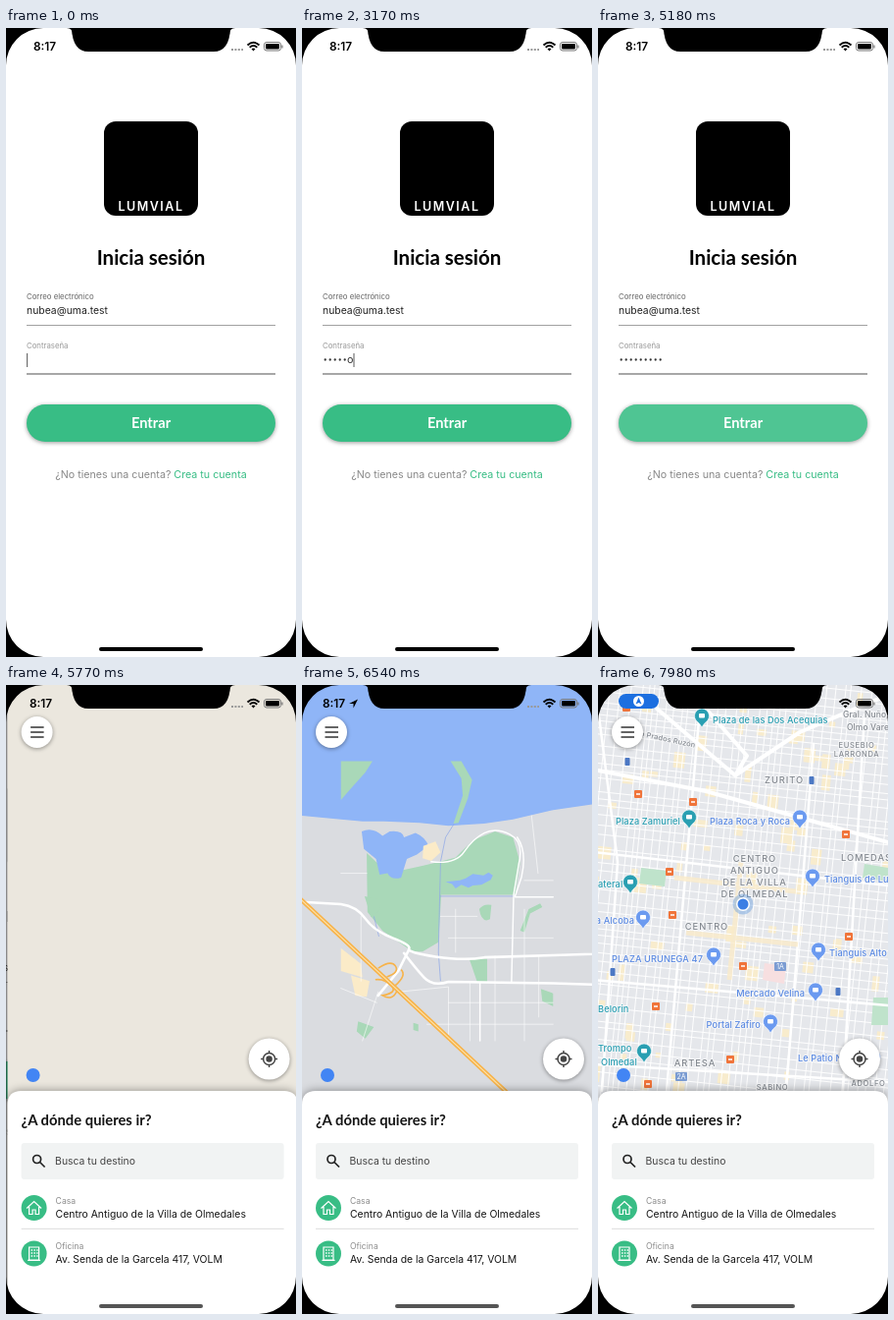
An HTML page for the animation above (8 s loop, 296 by 640 pixels).

```html
<!DOCTYPE html>
<html lang="es">
<head>
<meta charset="utf-8">
<style>
html, body { margin: 0; width: 100%; height: 100%; overflow: hidden; background: #fff }
svg { display: block; width: 100%; height: 100%; font-family: Inter, "Open Sans", sans-serif }
.h { font-family: Lato, "Open Sans", sans-serif; font-weight: 700 }
.mid { text-anchor: middle }
.lift { filter: drop-shadow(0 1px 2px #0006) }
.road { fill: none; stroke: #fff; stroke-linecap: round; stroke-linejoin: round }
.halo text { paint-order: stroke; stroke: #f4f5f7; stroke-width: 2px; stroke-linejoin: round }
</style>
</head>
<body>
<svg viewBox="0 0 296 640">
  <defs>
    <linearGradient id="edge"><stop offset="0" stop-opacity="0"/><stop offset="1" stop-opacity=".5"/></linearGradient>
    <clipPath id="btn"><rect x="21" y="383" width="254" height="38" rx="19"/></clipPath>
  </defs>

  <g id="login">
    <rect width="296" height="640" fill="#fff"/>
    <rect x="100" y="95" width="96" height="96" rx="12"/>
    <text x="148" y="186" class="mid" font-size="12.5" font-weight="600" letter-spacing="1.5" fill="#fff">LUMVIAL</text>
    <text x="148" y="240.500" class="h mid" font-size="20.500">Inicia sesión</text>
    <text x="21" y="276" font-size="7.800" fill="#666">Correo electrónico</text>
    <text x="21" y="291" font-size="10.400" fill="#222">nubea@uma.test</text>
    <path d="M21 302.500H275" stroke="#8a8a8a" stroke-width=".8"/>
    <text x="21" y="326" font-size="7.800" fill="#999">Contraseña</text>
    <g id="dots" fill="#333"></g>
    <text id="last" y="341" font-size="10.800" fill="#333">o</text>
    <path id="cursor" d="M0 331V345" stroke="#666" stroke-width="1.100"/>
    <path d="M21 352H275" stroke="#8a8a8a" stroke-width="1.400"/>
    <rect class="lift" x="21" y="383" width="254" height="38" rx="19" fill="#38bd85"/>
    <circle id="ripple" cx="148" cy="402" fill="#fff" opacity=".22" clip-path="url(#btn)"/>
    <text x="148" y="407" class="h mid" font-size="14.700" fill="#fff">Entrar</text>
    <text x="148" y="457.500" class="mid" font-size="10.700" fill="#888">¿No tienes una cuenta? <tspan fill="#38bd85">Crea tu cuenta</tspan></text>
  </g>

  <g id="page">
    <rect x="-16" width="16" height="640" fill="url(#edge)"/>
    <rect width="296" height="640" fill="#ebe7de"/>

    <g id="bay">
      <rect x="-500" y="-500" width="1300" height="1400" fill="#dadce0"/>
      <path fill="#8fb5f7" d="M-500 -500H800V20L296 92 240 105 200 111 150 114 110 110 60 108 30 108 0 105 -500 60Z"/>
      <g fill="#a9d8b8">
        <path d="M0 24H44L34 40 14 62 0 78ZM153 24H168L183 50 177 76 164 110 157 111 170 72 168 48Z"/>
        <path d="M36 152L66 180 112 170 138 164 160 158 184 134 215 122 240 130 250 165 243 210H140L136 276 114 289 100 289 58 260 37 234Z"/>
        <path d="M33 212L56 216 54 232 42 241ZM193 230Q198 222 210 224L208 244Q196 250 193 230ZM262 230L278 222 281 227 264 236 256 262 250 260ZM179 299H204V331H190ZM101 388L108 390V400L101 398ZM279 341L296 347V365L281 358ZM24 386L46 394 34 410 22 400Z"/>
      </g>
      <path fill="#8fb5f7" d="M29 122Q44 115 58 128L68 122Q86 120 88 130L104 124Q118 130 122 142L106 154 92 160 84 186Q70 190 65 180L54 182 49 160 32 146ZM146 192L166 190 174 187 184 181 199 183 206 179 212 183 209 189 196 196 184 197 178 200 168 196 160 201 155 195Z"/>
      <path fill="#fbebc8" d="M115 142L132 136 139 151 126 163 114 159ZM0 284L28 306 30 325 0 316ZM14 322L40 330 36 352 20 350Z"/>
      <path fill="none" stroke="#8fa8e6" stroke-width="1" d="M158 111L146 130 139 164 136 290 139 330M138 212H243M46 240L53 268"/>
      <g class="road">
        <path stroke-width=".8" d="M0 180H36M0 340L50 360M28 240V330M80 345L150 338V413M180 332V413M215 295V413M256 230V413M238 270H296M150 270H238M139 240H190M276 295V380M150 360H296M120 390H296M160 230V290M256 190H296M30 413L52 345M266 100L275 180"/>
        <path stroke-width="2" d="M126 164Q160 168 172 150T200 124 236 126 248 168L241 210 238 332M246 130Q260 150 252 185L243 212M243 213H296M194 332V413"/>
        <path stroke-width="3.500" d="M-400 200L0 223Q22 226 34 243T72 270 95 285 132 296 200 297L296 294 800 280M95 286L80 316 52 350M88 291Q104 312 116 325T150 331L296 333 800 350"/>
      </g>
      <g fill="none" stroke="#f7b34a">
        <path stroke-width="2.200" d="M52 312Q70 300 76 309T64 324M48 328Q60 326 70 336T58 350Q72 358 78 344M76 336Q92 322 84 314"/>
        <path stroke-width="6" d="M-403 -108L558 790"/>
        <path stroke="#fde3ac" stroke-width="1.500" d="M-403 -108L558 790"/>
      </g>
    </g>

    <g id="far">
      <rect x="-400" y="-600" width="1100" height="1600" fill="#e3e5ea"/>
      <g id="farGrid"></g>
      <path fill="#a5d6b6" d="M35 184L73 188 70 206 33 202ZM0 244L10 247 8 254 0 252ZM62 393L78 396 75 404 60 401Z"/>
      <path class="road" stroke-width="5" d="M-10 203Q42 176 60 150L92 122"/>
      <path class="road" stroke-width="3" d="M-10 103L90 116M20 210L4 420M46 24L34 184M0 330L90 342"/>
      <rect x="82" y="-600" width="800" height="1600" fill="#b7e0c6"/>
    </g>

    <g id="city">
      <rect width="296" height="420" fill="#e5e7eb"/>
      <g id="cityGrid"></g>
      <path fill="#bfe3cb" d="M44 186L70 189 68 205 42 202ZM281 318H296V346H279ZM272 182L296 186V200L270 196Z"/>
      <g class="road">
        <path stroke-width="4" d="M60 24L140 92 206 48 296 10M140 92L152 72 110 24M-5 86L110 108 296 160"/>
        <path stroke-width="2.500" d="M104 24L70 413M220 60L192 413M-5 300L296 326M-5 170L296 204M0 24L20 180 4 413M272 30L250 413M-5 386L296 404"/>
      </g>
      <path fill="none" stroke="#faecca" stroke-width="5" d="M78 196L202 210M146 180L134 300M90 252L204 264" opacity=".8"/>
      <path fill="#f7dfe0" d="M170 283L192 286 190 304 168 300Z"/>
    </g>
    <g id="labels" class="halo"></g>

    <g id="dot">
      <circle cx="148" cy="223" r="10.500" fill="#5b95dd" opacity=".4"/>
      <circle cx="148" cy="223" r="7" fill="#fff"/>
      <circle cx="148" cy="223" r="5.500" fill="#3d7fe4"/>
    </g>

    <circle cx="26" cy="397" r="7" fill="#4285f4"/>
    <g class="lift"><circle cx="30" cy="48" r="16" fill="#fff"/><circle cx="267" cy="380.500" r="21" fill="#fff"/></g>
    <path d="M23.500 43H37M23.500 48H37M23.500 53H37" stroke="#333" stroke-width="1.300"/>
    <g fill="none" stroke="#444" stroke-width="1.500">
      <circle cx="267" cy="380.500" r="6"/><circle cx="267" cy="380.500" r="2.500" fill="#444"/>
      <path d="M267 372V375M267 386V389M258.500 380.500H261.500M272.500 380.500H275.500"/>
    </g>

    <path fill="#fff" style="filter:drop-shadow(0 -1px 4px #0005)" d="M0 645V427Q0 413 14 413H282Q296 413 296 427V645Z"/>
    <text x="14" y="447.500" class="h" font-size="14.800" fill="#151515">¿A dónde quieres ir?</text>
    <rect x="14" y="466" width="268" height="37" rx="3" fill="#f1f3f3"/>
    <g fill="none" stroke="#222" stroke-width="1.700"><circle cx="30" cy="482.500" r="4"/><path d="M33 485.500L38 490.500"/></g>
    <text x="48.500" y="488" font-size="10.400" fill="#444">Busca tu destino</text>
    <path d="M14 553.300H282" stroke="#dcdcdc" stroke-width="1"/>
    <g fill="#38bd85"><circle cx="27" cy="532" r="13"/><circle cx="27" cy="578.500" r="13"/></g>
    <g fill="none" stroke="#fff" stroke-width="1.200">
      <path d="M19.500 532.500L27 525.500 34.500 532.500M22 531V538.500H25.500V534H28.500V538.500H32V531"/>
      <path d="M22 585V572H32V585ZM20.500 585.300H33.500"/>
      <path stroke-width="1.500" stroke-dasharray="1.500 1.300" d="M24 575H31M24 578H31M24 581H31"/>
    </g>
    <g font-size="8.600" fill="#8b8b8b"><text x="49" y="528">Casa</text><text x="49" y="574">Oficina</text></g>
    <g font-size="10.400" fill="#151515"><text x="49" y="542">Centro Antiguo de la Villa de Olmedales</text><text x="49" y="588">Av. Senda de la Garcela 417, VOLM</text></g>
  </g>

  <path d="M67 0Q68 24 84 24H212Q228 24 229 0Z"/>
  <path d="M62 0Q68 0 68 7V0ZM234 0Q228 0 228 7V0Z"/>
  <path fill-rule="evenodd" d="M0 0H296V640H0ZM0 38V602A38 38 0 0 0 38 640H258A38 38 0 0 0 296 602V38A38 38 0 0 0 258 0H38A38 38 0 0 0 0 38Z"/>
  <text id="clock" y="23" font-size="11.800" font-weight="600">8:17</text>
  <path id="arrow" d="M48 19L57 14.500 52.500 23.500V19Z"/>
  <g id="pill">
    <rect x="21" y="9" width="41" height="15" rx="7.500" fill="#1c6fe0"/>
    <circle cx="41.500" cy="16.500" r="5.500" fill="#fff"/>
    <path d="M41.500 12.500L44.500 19.500 41.500 18 38.500 19.500Z" fill="#1c6fe0"/>
  </g>
  <path id="signal" d="M230 22H242" stroke="#999" stroke-width="1.800" stroke-dasharray="2 1.400"/>
  <g fill="none" stroke="#000" stroke-width="1.900">
    <path d="M246.500 17.500Q252.500 12 258.500 17.500M248.700 19.700Q252.500 16.300 256.300 19.700"/>
    <path stroke="none" fill="#000" d="M250.500 21.300Q252.500 19.600 254.500 21.300L252.500 23.500Z"/>
    <rect x="263.500" y="14.500" width="17" height="8.500" rx="2.500" stroke="#777" stroke-width="1"/>
    <rect x="265" y="16" width="14" height="5.500" rx="1.300" stroke="none" fill="#000"/>
    <path d="M282 17.500V20.500" stroke="#777" stroke-width="1.200"/>
  </g>
  <rect id="home" x="95" y="630" width="106" height="4" rx="2"/>
</svg>

<script>
const $ = id => document.getElementById(id);
const set = (id, attrs) => { for (const k in attrs) $(id).setAttribute(k, attrs[k]); };
const show = (id, on) => $(id).style.display = on ? '' : 'none';
const ramp = (t, a, b) => Math.min(1, Math.max(0, (t - a) / (b - a)));

// Street grid: tilted lines at uneven distances over pale building blocks
function grid(id, seed, gap, tilt, blocks, line) {
  const rnd = () => (seed = (seed * 16807) % 2147483647) / 2147483647;
  let out = `<g transform="rotate(${tilt} 148 210)">`;
  for (let i = 0; i < blocks; i++)
    out += `<rect x="${rnd() * 340 - 20}" y="${rnd() * 460 - 20}" width="${5 + rnd() * 9}" height="${5 + rnd() * 12}" fill="#f8eccd"/>`;
  let d = '';
  for (let x = -60; x < 360; x += gap * (.6 + rnd() * .9)) d += `M${x} -60V500`;
  for (let y = -60; y < 500; y += gap * (.7 + rnd() * 1.2)) d += `M-60 ${y}H360`;
  $(id).innerHTML = out + `<path class="road" stroke-width="${line}" d="${d}"/></g>`;
}
grid('farGrid', 71, 9, 7, 200, 1.1);
grid('cityGrid', 29, 8, 6, 100, .9);

const blue = '#5b8ae2', teal = '#2a9fb2', gray = '#858a91';
const pin = (x, y, c) => `<path fill="${c}" stroke="#fff" stroke-width=".6" d="M${x} ${y + 11}Q${x - 2} ${y + 7} ${x - 6} ${y + 4}A7.500 7.500 0 1 1 ${x + 6} ${y + 4}Q${x + 2} ${y + 7} ${x} ${y + 11}Z"/>
  <rect x="${x - 3}" y="${y - 3}" width="6" height="4.500" rx="1" fill="#fff"/>`;
const label = (x, y, s, c, anchor, size = 9.2, gap = .1) =>
  `<text x="${x}" y="${y}" fill="${c}" text-anchor="${anchor}" font-size="${size}" font-weight="500" letter-spacing="${gap}">${s}</text>`;

$('labels').innerHTML = [
  ...[[41, 111], [97, 119], [73, 190], [76, 234], [148, 286], [59, 327], [135, 381], [253, 152], [256, 256], [51, 406], [29, 23]]
    .map(([x, y]) => `<rect x="${x - 4}" y="${y - 4}" width="8" height="8" rx="1" fill="#f0743a"/><path d="M${x - 2} ${y}H${x + 2}" stroke="#fff" stroke-width="1.500"/>`),
  ...[[30, 78], [15, 292], [218, 97], [245, 312], [186, 286, '1A'], [85, 398, '2A']]
    .map(([x, y, s]) => s ? `<rect x="${x - 6}" y="${y - 4}" width="12" height="9" rx="1" fill="#7b9cd2"/><text x="${x}" y="${y + 3}" class="mid" style="stroke:none" font-size="7" fill="#fff">${s}</text>`
      : `<rect x="${x - 2.5}" y="${y - 4}" width="5" height="8" rx="1" fill="#4c78c4"/>`),
  ...[[106, 32], [93, 135], [33, 201], [47, 373]].map(([x, y]) => pin(x, y, teal)),
  ...[[206, 135], [219, 195], [46, 237], [118, 275], [225, 270], [222, 311], [176, 343], [281, 379]].map(([x, y]) => pin(x, y, '#6b9af0')),
  ...[[117, 39, 'Plaza de las Dos Acequias'], [0, 206, 'ateral'], [0, 373, 'Trompo'], [3, 387, 'Olmedal'], [0, 333, 'Belorin']]
    .map(([x, y, s]) => label(x, y, s, teal, 'start')),
  label(84, 142, 'Plaza Zamuriel', teal, 'end'),
  ...[[196, 142, 'Plaza Roca y Roca'], [37, 243, 'a Alcoba'], [107, 282, 'PLAZA URUNEGA 47'], [211, 317, 'Mercado Velina'], [166, 349, 'Portal Zafiro']]
    .map(([x, y, s]) => label(x, y, s, blue, 'end')),
  ...[[231, 201, 'Tianguis de Luz'], [236, 276, 'Tianguis Alto'], [204, 383, 'Le Patio Nid']]
    .map(([x, y, s]) => label(x, y, s, blue, 'start')),
  ...[[190, 100, 'ZURITO'], [160, 180, 'CENTRO'], [160, 192, 'ANTIGUO'], [160, 204, 'DE LA VILLA'], [160, 216, 'DE OLMEDAL'], [111, 249, 'CENTRO'], [274, 179, 'LOMEDAS'], [99, 388, 'ARTESA']]
    .map(([x, y, s]) => label(x, y, s, gray, 'middle', 9.4, .9)),
  ...[[264, 64, 'EUSEBIO'], [264, 73, 'LARRONDA'], [178, 412, 'SABINO'], [276, 408, 'ADOLFO']]
    .map(([x, y, s]) => label(x, y, s, gray, 'middle', 7.6, .6)),
  ...[[250, 33, 'Gral. Nuño,'], [254, 46, 'Olmo Varel']].map(([x, y, s]) => label(x, y, s, gray, 'start', 8.5)),
  `<g transform="rotate(12 20 45)">${label(16, 47, 'Anselmo Prados Ruzón', gray, 'start', 7.5)}</g>`
].join('');

const keys = [1420, 2020, 2340, 2600, 2910, 3170, 3450, 3700, 3910];
$('dots').innerHTML = keys.map((_, i) => `<circle cx="${23.7 + i * 5}" cy="337.500" r="1.150"/>`).join('');

// Fast start, long soft end: cubic-bezier(.35, .91, .33, .97)
function slideEase(x) {
  let lo = 0, hi = 1;
  const at = (s, a, b) => 3 * s * (1 - s) ** 2 * a + 3 * s * s * (1 - s) * b + s ** 3;
  for (let i = 0; i < 24; i++) {
    const m = (lo + hi) / 2;
    at(m, .35, .33) < x ? lo = m : hi = m;
  }
  return at(lo, .91, .97);
}

const zoom = k => `translate(148 223) scale(${k}) translate(-148 -223)`;

function draw(t) {
  const typed = keys.filter(k => t >= k).length;
  const plain = typed && t < 4900;
  const hidden = plain ? typed - 1 : typed;
  [...$('dots').children].forEach((c, i) => c.style.display = i < hidden ? '' : 'none');
  show('last', plain);
  const x = 21 + hidden * 5;
  set('last', { x });
  const blink = t < 1420
    ? 1 - ramp(t, 160, 390) + ramp(t, 680, 910) - ramp(t, 1200, 1415)
    : 1 - ramp(t, 4600, 4810);
  set('cursor', { transform: `translate(${x + (plain ? 7 : .6)} 0)`, opacity: blink });
  set('ripple', { r: 135 * ramp(t, 4780, 5080), opacity: .22 * (1 - ramp(t, 5080, 5300)) });

  const s = slideEase(ramp(t, 5270, 5830));
  set('login', { transform: `translate(${-98.7 * s} 0)` });
  set('page', { transform: `translate(${296 * (1 - s)} 0)` });
  show('page', t >= 5270);

  // Camera leaves the bay, then drops onto the far city
  const out = ramp(t, 6380, 6640), land = ramp(t, 6600, 6870);
  show('bay', t >= 6150 && t < 6640);
  set('bay', { opacity: ramp(t, 6150, 6310), transform: zoom(1 - .7 * out * out) });
  show('far', t >= 6640 && t < 7320);
  set('far', { transform: zoom(.4 + .6 * (1 - (1 - land) ** 2)) });
  show('city', t >= 7180);
  set('city', { opacity: ramp(t, 7120, 7320) });
  set('labels', { opacity: ramp(t, 7320, 7700) });
  show('labels', t >= 7320);
  show('dot', t >= 6700);

  const pill = ramp(t, 7320, 7540);
  set('clock', { x: 28 - 7 * ramp(t, 5600, 5900), opacity: 1 - pill });
  set('pill', { opacity: pill });
  set('signal', { opacity: 1 - pill });
  const fixed = t >= 6440;
  set('arrow', { opacity: ramp(t, 5880, 6100) * (1 - pill), fill: fixed ? '#000' : 'none', stroke: fixed ? 'none' : '#777',
    transform: fixed ? '' : 'translate(15.700 5.700) scale(.7)' });
  set('home', { fill: s > .5 ? '#555' : '#000' });
}

const start = performance.now();
(function tick() {
  draw((performance.now() - start) % 8000);
  requestAnimationFrame(tick);
})();
</script>
</body>
</html>
```
